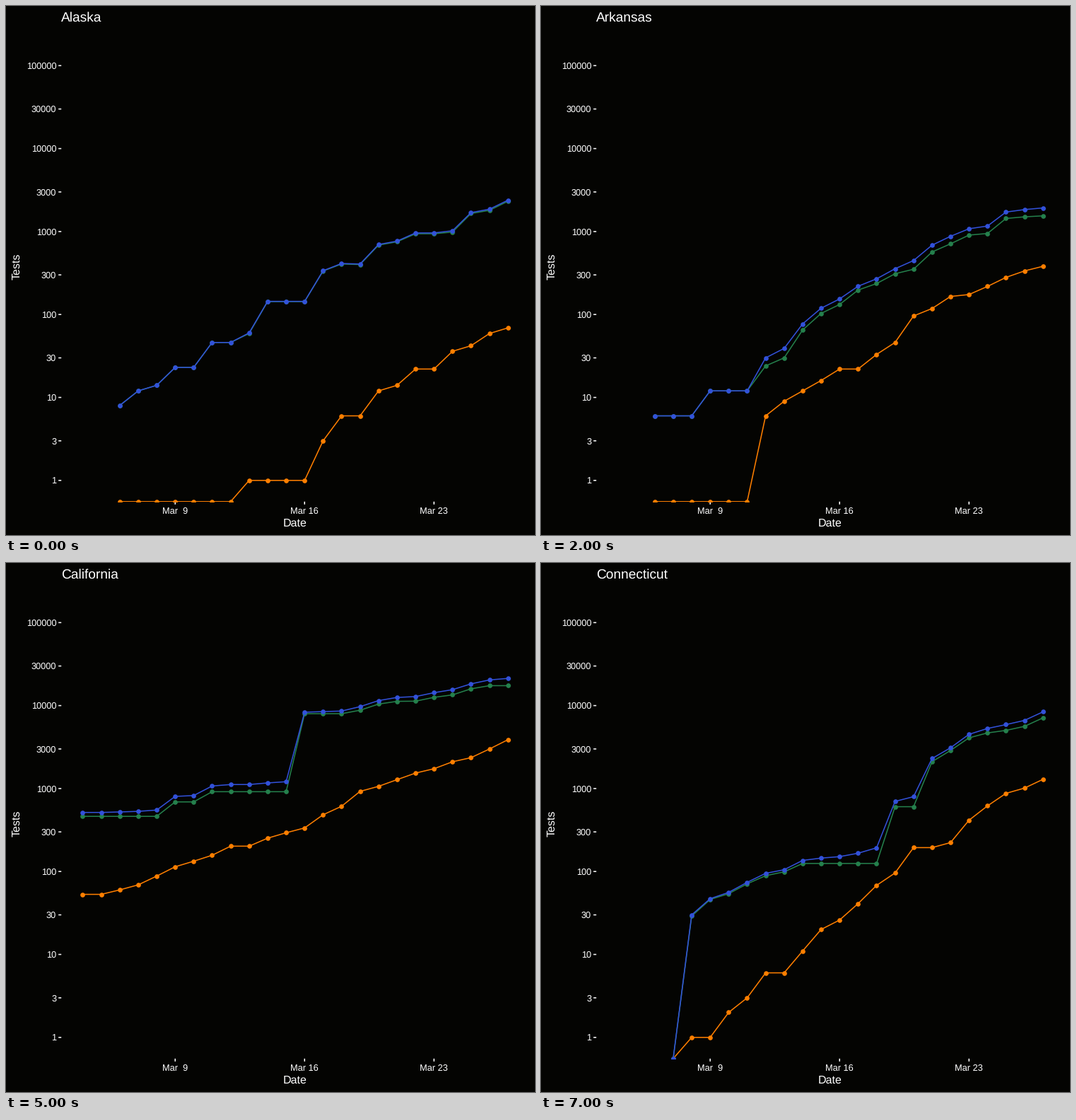
A matplotlib script for the animation above (8 s loop, 748 by 748 pixels).

```python
import numpy as np
import matplotlib.pyplot as plt
from matplotlib.animation import FuncAnimation
from matplotlib.patches import Rectangle

SIZE, DPI = 748, 100
PX = 72 / DPI  # points per pixel
BG, INK = "#040402", "white"
ORANGE, GREEN, BLUE = "#ff7f00", "#24804c", "#3251da"
LEFT, RIGHT, TOP, BOTTOM = 78.2, 739.8, 35.5, 700.8
LAST_DAY = 27

plt.rcParams["font.family"] = "Liberation Sans"
plt.rcParams["text.hinting"] = "none"

states = []


def add(name, first, positive, negative):
    """Daily cumulative counts from March `first` on."""
    days = np.arange(first, LAST_DAY + 1)
    states.append((name, days, np.array(positive), np.array(negative)))


add("Alaska", 6,
    [0] * 7 + [1] * 4 + [3, 6, 6, 12, 14, 22, 22, 36, 42, 59, 69],
    [8, 12, 14, 23, 23, 46, 46, 59, 143, 143, 143, 334, 406, 400, 686, 752,
     940, 940, 986, 1649, 1801, 2319])
add("Alabama", 7,
    [0] * 6 + [1, 6, 12, 28, 36, 46, 68, 81, 124, 138, 167, 215, 283, 506, 587],
    [0] * 3 + [10] * 4 + [22] + [28] * 7 + [1464, 1665, 2106, 2321, 3593, 4184])
add("Arkansas", 6,
    [0] * 6 + [6, 9, 12, 16, 22, 22, 33, 46, 96, 118, 165, 174, 218, 280,
               335, 381],
    [6, 6, 6, 12, 12, 12, 24, 30, 65, 103, 132, 197, 236, 310, 351, 567, 711,
     906, 947, 1437, 1504, 1545])
add("American Samoa", 16, [0] * 12, [0] * 12)
add("Arizona", 4,
    [2, 2, 3, 5, 5, 5, 6, 9, 9, 9, 12, 12, 18, 20, 28, 44, 65, 104, 152, 265,
     357, 450, 577, 736],
    [27, 28, 33, 44, 44, 44, 51, 59, 82, 94, 121, 121, 125, 142, 148, 175,
     211, 240, 282, 309, 313, 323, 347, 7455])
add("California", 4,
    [53, 53, 60, 69, 88, 114, 133, 157, 202, 202, 252, 293, 335, 483, 611,
     924, 1063, 1279, 1536, 1733, 2102, 2355, 2998, 3879],
    [462] * 5 + [690] * 2 + [916] * 5 + [7981] * 3
    + [8787, 10424, 11249, 11304, 12567, 13452, 15921, 17380, 17380])
add("Colorado", 5,
    [0, 2, 8, 8, 9, 12, 28, 45, 72, 101, 131, 131, 160, 183, 216, 277, 363,
     475, 591, 720, 912, 1086, 1430],
    [19, 46, 55, 104, 133, 142, 251, 298, 526, 610, 627, 627, 1056, 1617,
     2112, 2675, 3317, 4075, 4845, 5504, 6789, 6976, 8692])
add("Connecticut", 7,
    [0, 1, 1, 2, 3, 6, 6, 11, 20, 26, 41, 68, 96, 194, 194, 223, 415, 618,
     875, 1012, 1291],
    [0, 29, 46, 54, 71, 89, 99] + [125] * 5
    + [604, 604, 2106, 2875, 4085, 4682, 5023, 5616, 7109])


def x_of(day):
    return 239.2 + 183 / 7 * (day - 9)


def y_of(count):
    """Log scale; zero sits on the panel's lower edge."""
    y = 670.8 - 117.3 * np.log10(np.maximum(count, 1e-9))
    return np.minimum(y, BOTTOM)


fig = plt.figure(figsize=(SIZE / DPI, SIZE / DPI), dpi=DPI, facecolor=BG)
ax = fig.add_axes([0, 0, 1, 1])
ax.set_xlim(0, SIZE)
ax.set_ylim(SIZE, 0)
ax.axis("off")


def label(x, y, text, size, **kw):
    return ax.text(x, y, text, size=size * PX, color=INK, va="baseline", **kw)


def tick(xs, ys):
    ax.plot(xs, ys, color=INK, lw=1.55 * PX, solid_capstyle="butt", snap=False)


for value in [1, 3, 10, 30, 100, 300, 1000, 3000, 10000, 30000, 100000]:
    y = y_of(value)
    tick([LEFT - 4, LEFT], [y, y])
    label(71.2, y + 4.6, str(value), 12.8, ha="right")
for day in (9, 16, 23):
    x = x_of(day)
    tick([x, x], [BOTTOM, BOTTOM + 4])
    label(x, 718, f"Mar {day:2d}", 12.8, ha="center")

label(409, 736.3, "Date", 16, ha="center")
ax.text(19.8, 368, "Tests", size=16 * PX, color=INK, rotation=90,
        rotation_mode="anchor", ha="center", va="baseline")
title = label(78.2, 22.3, "", 19.2, ha="left")

panel = Rectangle((LEFT, TOP), RIGHT - LEFT, BOTTOM - TOP,
                  transform=ax.transData)
curves = []
for z, color in enumerate((ORANGE, GREEN, BLUE)):
    curve, = ax.plot([], [], color=color, lw=1.55 * PX, marker="o",
                     ms=6.7 * PX, mew=0, zorder=3 + z,
                     solid_joinstyle="round")
    curve.set_clip_path(panel)
    curves.append(curve)


def update(i):
    name, days, positive, negative = states[i]
    title.set_text(name)
    for curve, counts in zip(curves, (positive, negative, positive + negative)):
        curve.set_data(x_of(days), y_of(counts))
    return [title, *curves]


anim = FuncAnimation(fig, update, frames=len(states), interval=1000,
                     repeat=True, repeat_delay=0, blit=False)
plt.show()
```
